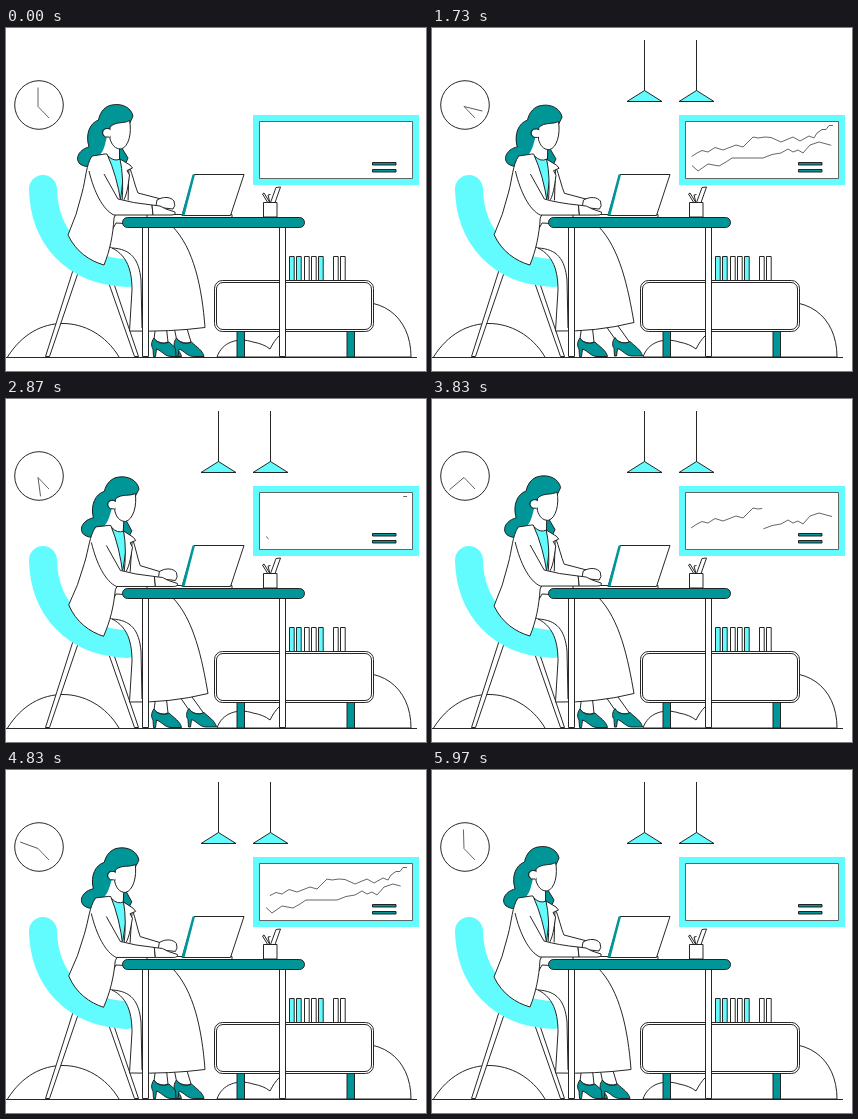
An HTML page for the animation above (6000 ms loop, 420 px wide and 343 px high).

```html
<!DOCTYPE html>
<html lang="en">
<head>
<meta charset="utf-8">
<title>Office desk</title>
<style>
  html, body { margin: 0; width: 100%; height: 100%; overflow: hidden; background: #fff; }
  svg { display: block; width: 100%; height: 100%; }
  .ink { fill: #fff; stroke: #1c1c1c; stroke-width: .95; stroke-linejoin: round; }
  .line { fill: none; }
  .bare { stroke: none; }
  .teal { fill: #009698; }
  .cyan { fill: #62fcff; }
  .thin { stroke: #555; stroke-width: .9; }
  .seat { stroke: #62fcff; stroke-width: 28; stroke-linecap: round; }
</style>
</head>
<body>
<svg viewBox="0 0 420 343" class="ink">
  <defs>
    <path id="shoe" class="teal" d="M148 310 C145 314 145 318 147 321 L147.500 328.500 H149.500 L150.500 321 C156 323 159 328.500 165 328.500 H175.500 C174 322 168 319 163 314 C157 317 151 315 148 310Z"/>
    <g id="lamp">
      <path class="line" d="M0 0V51"/>
      <path class="cyan" d="M0 50.500 L-17.500 61.500 H17.500Z"/>
    </g>
  </defs>

  <!-- bushes and floor -->
  <path d="M1.500 329 C16 306 36 295.500 57 295.500 S100 307 113 329"/>
  <path d="M330 278 C374 264 405 288 405 329 H211 C216 314 232 309 247 314 Q258 316 264 321 C275 299 290 296 330 278Z"/>
  <path class="line" d="M0 329.500H411"/>

  <!-- clock -->
  <circle cx="33" cy="77" r="24.300"/>
  <path class="line thin" d="M32 78.500 43 90"/>
  <path id="minute" class="line thin" d="M32 78.500V59.500"/>

  <use id="lampA" href="#lamp"/>
  <use id="lampB" href="#lamp"/>

  <!-- board -->
  <path class="cyan bare" d="M247 87H413V157H247Z"/>
  <path class="thin" d="M253.500 93.500H406.500V150.500H253.500Z"/>
  <path id="upper" class="line thin" pathLength="100" d="M259 129 265 125 270 122.500 276 124 283 119.500 291 122 304 117 311 119 321 109 326 110 333 109 339 109.500 349 114 361 109 368 113 377 108 382 110 385 105 390 101.500 394 101.500 397 97.500H401"/>
  <path id="lower" class="line thin" pathLength="100" d="M400 117.500 387 114 378 117 371 125 366 122 361 124 356 121 349 125 340 126.500 331 130 311 130 300 130 294 134 287 138 276 136 266 143 260 137.500"/>
  <path class="teal" d="M366.500 134.500H390V137H366.500ZM366.500 141.500H390V144H366.500Z"/>

  <!-- cabinet -->
  <path class="teal" d="M231 303H238.500V329H231ZM341 303H348.500V329H341Z"/>
  <g id="books"></g>
  <rect x="208.500" y="252.500" width="159" height="51" rx="8"/>
  <rect x="210.500" y="254.500" width="155" height="47" rx="6.500"/>

  <!-- chair -->
  <path d="M69 236 39.500 328.500 H43.500 L74 239ZM101 250 128.500 328.500H132.500L106 250Z"/>
  <path class="line seat" d="M37 161 C38 208 68 243 121 245"/>

  <!-- legs and skirt -->
  <path d="M150 296 148 311 Q155 317 162 314 L160 296Z"/>
  <use href="#shoe"/>
  <path id="leg"/>
  <use id="foot" href="#shoe"/>
  <path id="skirt"/>
  <path class="line" d="M106 220 C125 221 133 231 135 252 L136 300"/>

  <!-- woman -->
  <g id="head">
    <path class="teal" d="M127 88 C125 79 115 75 106 77 C99 78 94 84 92.500 92 C84 95 79 106 83 119 C74 121 68 130 74 136 C81 141 94 139 99 131 L119 137 122 130 114 117Z"/>
    <path class="bare" d="M101 108 C99 117 98 122 94 127 L98 137 H113.500 V116Z"/>
    <path class="line" d="M113.500 119V131"/>
    <path d="M104 99 C110 93 118 96 123.500 92.500 C126 104 123 119 115 121 C109 121 106 117 104 111Z"/>
    <circle class="bare" cx="101.500" cy="105" r="4.200"/>
    <path class="line" d="M104 101 C98 99 95 103 97 107 Q99 110 103 109"/>
  </g>
  <g id="torso">
    <path d="M123 138 C127 148 129 158 132 165 L155 171 153 180 122 176Z"/>
    <path class="cyan" d="M102 128 Q108 134 114 131 L118 143 114 176 105 160Z"/>
    <path d="M99 126 L86 128 C80 137 80 150 76 165 Q71 187 62 207 C70 224 84 233 98 237 C104 222 107 207 108 190 L115 175 Q111 148 101 126Z"/>
    <path d="M114 131 124 137 126.500 140 121 142.500 123.500 147 C122 158 121 168 116 175 Q118 149 114 131Z"/>
  </g>

  <!-- laptop and cup -->
  <path d="M141 186.500H226V189.500H141Z"/>
  <path d="M188 146.500H238L224.500 187.500H176Z"/>
  <path class="teal bare" d="M186.500 146.500H189L178.500 187.500H175.500Z"/>
  <path d="M264 176 270 159.500 274.500 159 268.500 176Z"/>
  <path class="line" d="M262 175 256.500 166 258 165 263.500 174M264 175 262 167 264.500 166.500"/>
  <path d="M257.500 174.500H271V189H257.500Z"/>

  <g id="arms">
    <path d="M151 172 C158 168 165 169 168 173 Q170 178 167 181 L158 180 150 178Z"/>
    <path class="bare" d="M84 140 C87 160 97 182 108 187 H147 L146 176 113 171 100 146Z"/>
    <path class="line" d="M83 143 C88 164 97 182 108 187 H147 L146 177 Q126 175 112 171 L98 146"/>
    <path d="M146 177 Q155 177 160 181 L169 184 Q170 187 165 187 H147Z"/>
  </g>

  <!-- desk -->
  <path d="M136.500 198H142.500V328.500H136.500ZM273.500 198H279.500V328.500H273.500Z"/>
  <rect class="teal" x="116.500" y="189.500" width="182" height="10" rx="5"/>
</svg>
<script>
const $ = id => document.getElementById(id);
const clamp = x => Math.min(1, Math.max(0, x));
const span = (t, from, to) => clamp((t - from) / (to - from));
const ease = x => (1 - Math.cos(Math.PI * x)) / 2;
const easeBack = x => 1 + 2.7 * (x - 1) ** 3 + 1.7 * (x - 1) ** 2;
const move = (id, value) => $(id).setAttribute('transform', value);
const shape = (id, d) => $(id).setAttribute('d', d);

$('books').innerHTML = [283, 290, 298, 305, 312, 327, 334].map((x, i) =>
  `<rect x="${x + .5}" y="228.500" width="4.700" height="24" class="${[0, 1, 4].includes(i) ? 'cyan' : ''}"/>`).join('');

function draw(t) {
  move('minute', `rotate(${t * 360 / 6000} 32 78.5)`);

  [['lampA', 212.5, 170], ['lampB', 264.5, 610]].forEach(([id, x, start]) => {
    const size = Math.max(0, easeBack(span(t, start, start + 700)));
    $(id).style.display = size > .01 ? '' : 'none';
    move(id, `translate(${x} 12) scale(${size})`);
  });

  // Each curve is drawn, then wiped in the same direction.
  const c = t % 3000;
  const tip = 100 * ease(span(c, 0, 1670));
  const tail = 100 * ease(span(c, 1670, 3000));
  for (const id of ['upper', 'lower'])
    $(id).setAttribute('stroke-dasharray', `0 ${tail} ${tip - tail} 200`);

  const sway = ease(t / 1000);
  const nod = 1 - (1 - sway) ** 7;
  move('torso', `rotate(${2.3 * sway} 90 225)`);
  move('head', `rotate(${1.2 * sway + 1.8 * nod} 88 205)`);
  move('arms', `translate(${2.5 * sway} ${.5 * sway})`);

  const step = ease(span(t, 0, 1050)) - ease(span(t, 3850, 4850));
  const x = 12.5 * step;
  move('foot', `translate(${22.5 + x} ${-.5 * step})`);
  shape('leg', `M${167 + x / 3} 294 L${170.5 + x} 311 Q${178 + x} 317 ${185 + x} 314 L${179 + x / 3} 294Z`);
  shape('skirt', `M98 217 C120 223 126 240 126 262 L123.500 303
    Q164 304 ${199 + 3 * step} ${299.5 - 5 * step} C196 260 188 220 166 198 L110 195Z`);
}

function tick() {
  draw(performance.now() % 6000);
  requestAnimationFrame(tick);
}
tick();
</script>
</body>
</html>
```
